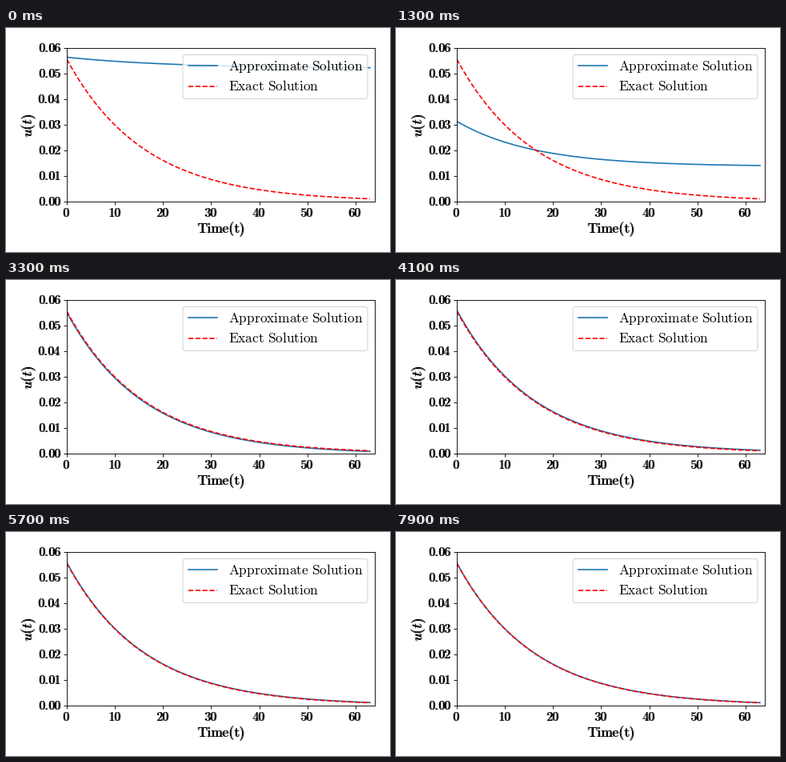
Recreate the animation shown at these times as a matplotlib script. Size 480 px wide and 280 px high, loop 8000 ms.

```python
import numpy as np
import matplotlib.pyplot as plt
from matplotlib.animation import FuncAnimation
from matplotlib.patches import FancyBboxPatch

plt.rcParams["mathtext.fontset"] = "cm"

W, H, DPI = 480, 280, 80
LEFT, RIGHT, TOP, BOTTOM = 76, 461, 25, 217
FRAMES, STEP = 80, 100
U0, U_END, RATE = .0556, .0011, .062
START0, START_END, LOW = .0564, .0523, .0115

t = np.arange(64)


def decay(first, last, rate):
    """Exponential from first at t=0 to last at the final t."""
    e = np.exp(-rate * t)
    return last + (first - last) * (e - e[-1]) / (1 - e[-1])


def approx(ms):
    """The curve drops as a whole, then rises and rings onto the exact one."""
    x = ms / 1000
    fall = max(0, 1 - x) ** 1.5
    s = max(0, x - 1)
    rise = 1 - np.exp(-(s / .4) ** 2)
    ripple = .014 * np.cos(2 * np.pi * (s - 1.05) / .95) / (1 + s) ** 2
    bump = .063 * s * np.exp(-(s / .5) ** 2)
    first = LOW + (START0 - LOW) * fall + (U0 - LOW + ripple) * rise
    last = START_END * fall + (U_END + ripple / 2) * rise + bump
    return decay(first, last, RATE - .017 * fall)


fig = plt.figure(figsize=(W / DPI, H / DPI), dpi=DPI, facecolor="white")
ax = fig.add_axes([LEFT / W, 1 - BOTTOM / H, (RIGHT - LEFT) / W, (BOTTOM - TOP) / H])
ax.set(xlim=(0, 64), ylim=(0, .06))
ax.set_xticks(range(0, 61, 10), labels=[])
ax.set_yticks(np.arange(7) / 100, labels=[])
line, = ax.plot(t, approx(0), "C0")
ax.plot(t, decay(U0, U_END, RATE), "r--")

# overlay in stage pixels for lettering and legend
page = fig.add_axes([0, 0, 1, 1])
page.set(xlim=(0, W), ylim=(H, 0))
page.axis("off")


def put(x, y, text, size, dx=1, dy=0, **kw):
    """Axis lettering, printed twice with a slight shift to look heavier."""
    kw = {"ha": "center", "va": "baseline", **kw}
    for k in (0, 1):
        page.text(x - k * dx, y - k * dy, text, size=size, **kw)


for n in range(7):
    put(LEFT + n * (RIGHT - LEFT) / 6.4, 236, f"${10 * n}$", 14)
    put(69.5, 222 - 32 * n, f"${n / 100:.2f}$", 14, ha="right")
put(269, 256, r"$\mathrm{Time(t)}$", 15.6)
put(28.5, 121.5, "$u(t)$", 15.6, dx=0, dy=1, rotation=90, va="center")

page.add_patch(FancyBboxPatch((221, 33.5), 231, 55, fc="white", ec="0.8", alpha=.8,
                              boxstyle="round,pad=0,rounding_size=3.6"))
for y, style, name in ((47.2, "C0-", "Approximate"), (72.5, "r--", "Exact")):
    page.plot([228.3, 263.9], [y, y], style)
    page.text(278, y + 5.5, rf"$\mathrm{{{name}\ Solution}}$", size=15.6)


def update(i):
    line.set_ydata(approx(i * STEP))
    return line,


anim = FuncAnimation(fig, update, frames=FRAMES, interval=STEP,
                     repeat=True, repeat_delay=0)
plt.show()
```
